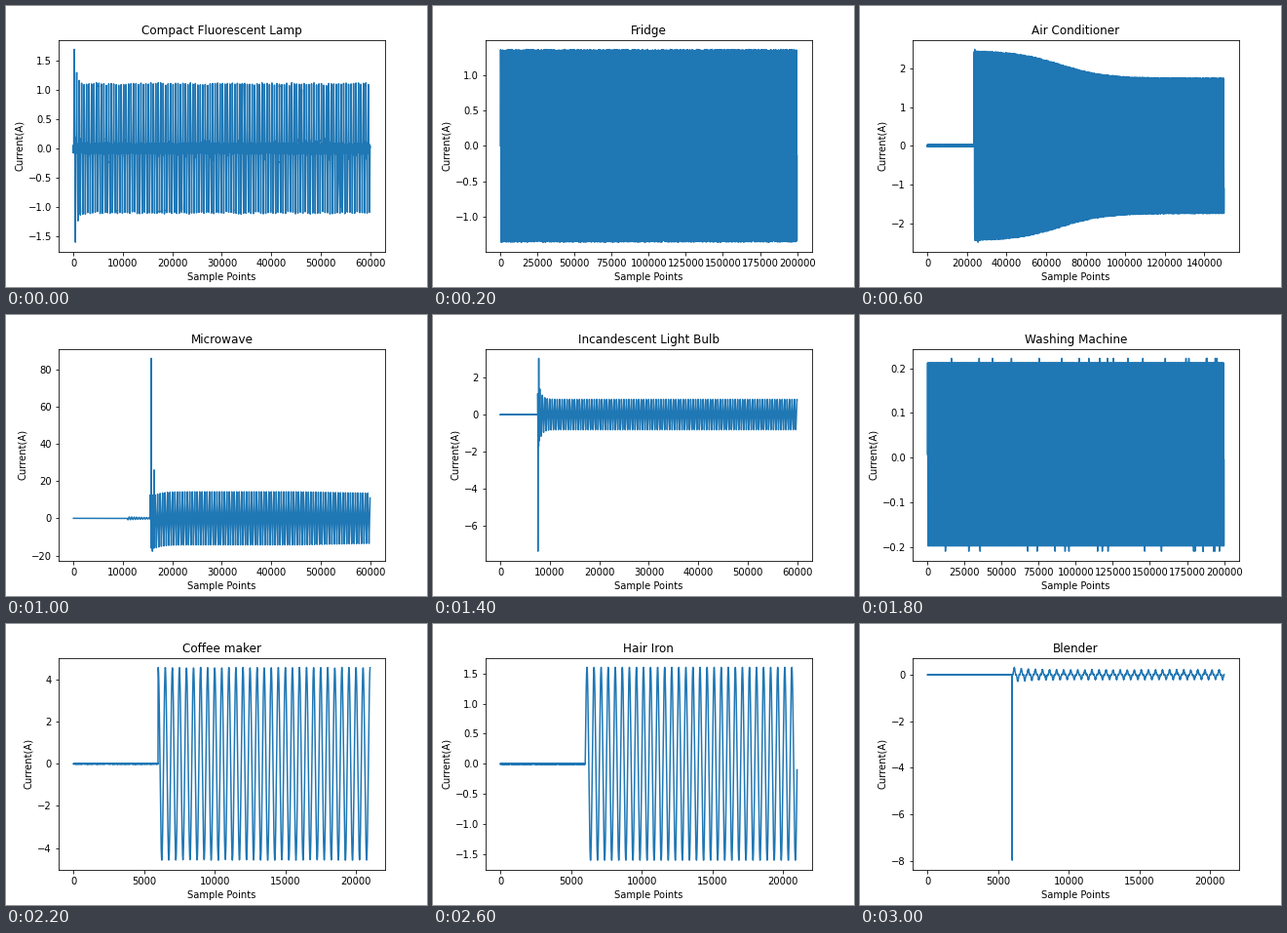
Animation of 432 by 288 pixels, one loop 3.2 s. Source, as a matplotlib script:

```python
import numpy as np
import matplotlib.pyplot as plt
from matplotlib.animation import FuncAnimation

PERIOD = 500  # samples per mains cycle
STEP = 5


def noise(s, amp, seed=1):
    return np.random.default_rng(seed).uniform(-amp, amp, len(s))


def wave(s, start=0, phase=0.0):
    return np.sin(2 * np.pi * (s - start) / PERIOD + phase)


def decay(s, start, tau):
    return np.exp(-np.clip(s - start, 0, None) / tau)


def after(s, start, y, idle=0.0):
    """Idle noise before the switch-on point, y afterwards."""
    return np.where(s < start, noise(s, idle, 7), y)


def surge(s, y, at, value):
    """Single-sample inrush spike."""
    y[int(at / STEP)] = value
    return y


def fluorescent(s):
    env = 1.09 * (1 + 0.72 * decay(s, 0, 500)) + noise(s, 0.03)
    w = wave(s, 25)
    y = env * w ** 5 + noise(s, 0.09, 2) * (np.abs(w) < 0.7)
    y = surge(s, y, 150, 1.66)
    return surge(s, y, 400, -1.6)


def fridge(s):
    return 1.45 * wave(s) + 0.12 * wave(3 * s) + noise(s, 0.03)


def hairdryer(s):
    return 6 * wave(s) + noise(s, 0.05)


def air_conditioner(s):
    env = 1.74 + 0.71 / (1 + np.exp((s - 67000) / 11300))
    y = after(s, 23550, env * wave(s, 23550) + noise(s, 0.015), 0.025)
    y = surge(s, y, 23900, 2.49)
    return surge(s, y, 25600, -2.49)


def laptop(s):
    return 1.6 * wave(s) ** 11 + noise(s, 0.05)


def microwave(s):
    w = wave(s, 15900)
    tail = np.clip((s - 45000) / 15000, 0, 1)
    y = (14.3 - 0.8 * tail) * (0.5 * w + 0.5 * w ** 5)
    y -= 1.8 * decay(s, 16500, 1500)
    hum = 0.8 * decay(s, 10900, 6000) * wave(s, 10900, np.pi)
    y = after(s, 15500, y)
    y = np.where((s > 10900) & (s < 15500), hum, y)
    y = surge(s, y, 15750, 86)
    y = surge(s, y, 15980, -17.7)
    return surge(s, y, 16300, 26)


def bulb(s):
    env = 0.82 + 1.1 * decay(s, 7600, 550)
    y = after(s, 7550, env * wave(s, 7600, np.pi), 0.01)
    y = surge(s, y, 7580, -7.37)
    return surge(s, y, 7750, 3.03)


def vacuum(s):
    env = 11 + 24 * decay(s, 9000, 2500)
    return after(s, 9000, env * wave(s, 9000), 0.1)


def fan(s):
    return 0.4 * wave(s) + noise(s, 0.01)


def washer(s):
    y = 0.007 + 0.205 * wave(s)
    rng = np.random.default_rng(4)
    y[rng.integers(0, len(s), 20)] = 0.222
    y[rng.integers(0, len(s), 20)] = -0.21
    return y


def heater(s):
    return after(s, 6000, 13 * wave(s, 6000), 0.05)


def coffee(s):
    env = 4.56 + noise(s, 0.02)
    return after(s, 5990, env * wave(s, 6000, np.pi / 2), 0.015)


def kettle(s):
    return after(s, 6000, 6 * wave(s, 6000), 0.03)


def hair_iron(s):
    return after(s, 6000, 1.6 * wave(s, 6000), 0.01)


def soldering(s):
    return after(s, 6000, 0.9 * wave(s, 6000), 0.005)


def blender(s):
    env = 0.2 + 0.12 * decay(s, 6000, 1000)
    y = env * wave(s, 6000, -0.2) ** 3 + noise(s, 0.015)
    return surge(s, after(s, 6000, y, 0.01), 6000, -7.97)


PLOTS = [
    ("Compact Fluorescent Lamp", 60000, fluorescent),
    ("Fridge", 200000, fridge),
    ("Hairdryer", 60000, hairdryer),
    ("Air Conditioner", 150000, air_conditioner),
    ("Laptop", 60000, laptop),
    ("Microwave", 60000, microwave),
    ("Vacuum", 60000, vacuum),
    ("Incandescent Light Bulb", 60000, bulb),
    ("Fan", 60000, fan),
    ("Washing Machine", 200000, washer),
    ("Heater", 21000, heater),
    ("Coffee maker", 21000, coffee),
    ("Water kettle", 21000, kettle),
    ("Hair Iron", 21000, hair_iron),
    ("Soldering Iron", 21000, soldering),
    ("Blender", 21000, blender),
]

plt.rcParams["agg.path.chunksize"] = 20000
fig, ax = plt.subplots(figsize=(6, 4), dpi=72)
fig.subplots_adjust(left=0.125, right=0.9, bottom=0.125, top=0.88)


def draw(i):
    title, n, signal = PLOTS[i]
    s = np.arange(0, n, STEP)
    ax.clear()
    ax.plot(s, signal(s), color="#1f77b4", lw=1.5)
    ax.set_title(title)
    ax.set_xlabel("Sample Points")
    ax.set_ylabel("Current(A)")


anim = FuncAnimation(fig, draw, frames=len(PLOTS), init_func=lambda: draw(0),
                     interval=200, repeat=True, repeat_delay=0)
plt.show()
```
